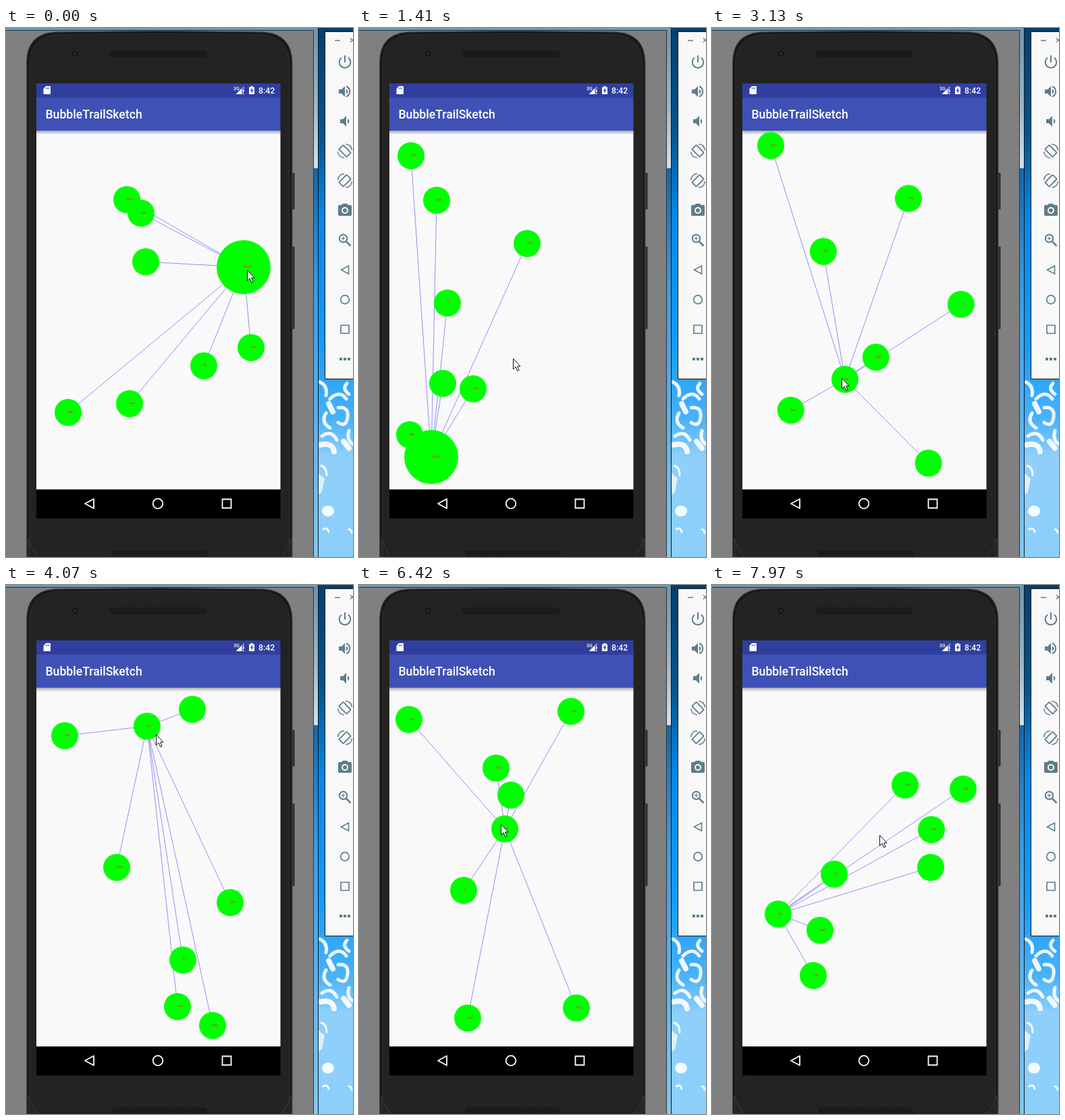
Recreate the animation shown at these times as an HTML page. Size 514 by 783 pixels, loop 8 s.

```html
<!DOCTYPE html>
<html lang="en">
<head>
<meta charset="utf-8">
<title>Node graph</title>
<style>
  html, body { margin: 0; width: 100%; height: 100%; overflow: hidden; background: #808080; }
  svg { display: block; width: 514px; height: 783px; }
  text { font-family: Roboto, "Open Sans", sans-serif; font-weight: 500; fill: #fff; }
  .icons { fill: none; stroke: #5f7d8b; stroke-width: 2; }
  .icons .solid { fill: #5f7d8b; stroke: none; }
  .nav { fill: none; stroke: #fff; stroke-width: 1.8; }
  .edge { stroke: #00f; stroke-opacity: .55; stroke-width: .8; }
  .node { fill: #0f0; }
  .label { font-size: 4.5px; font-weight: 400; fill: #ff2a00; }
</style>
</head>
<body>
<svg viewBox="0 0 514 783" xmlns="http://www.w3.org/2000/svg">
  <defs>
    <linearGradient id="sky" x2="0" y2="1">
      <stop offset="0" stop-color="#073f6c"/>
      <stop offset=".2" stop-color="#04558f"/>
      <stop offset=".36" stop-color="#0788e6"/>
      <stop offset=".6" stop-color="#179bf7"/>
      <stop offset=".74" stop-color="#4ab2fa"/>
      <stop offset=".81" stop-color="#8fd0fb"/>
      <stop offset="1" stop-color="#8ccffb"/>
    </linearGradient>
    <linearGradient id="glass" x2="0" y2="1">
      <stop offset="0" stop-color="#6f93ad"/>
      <stop offset=".15" stop-color="#9fb6c8"/>
      <stop offset=".264" stop-color="#d5e2ec"/>
      <stop offset=".266" stop-color="#1866a4"/>
      <stop offset=".5" stop-color="#3a9de6"/>
      <stop offset="1" stop-color="#86c6ee"/>
    </linearGradient>
    <linearGradient id="shade" x2="0" y2="1">
      <stop offset="0" stop-color="#000" stop-opacity=".32"/>
      <stop offset="1" stop-color="#000" stop-opacity="0"/>
    </linearGradient>
    <pattern id="mesh" width="4" height="4" patternUnits="userSpaceOnUse">
      <rect width="4" height="4" fill="#262626"/>
      <circle cx="1" cy="1" r="1" fill="#080808"/>
      <circle cx="3" cy="3" r="1" fill="#080808"/>
    </pattern>
  </defs>

  <!-- desktop -->
  <rect x="462" width="52" height="783" fill="url(#sky)"/>
  <g fill="none" stroke="#fff" stroke-linecap="round" stroke-width="5" opacity=".9">
    <path d="M465 524q12 6 9 20M480 549q14-14 24 0M505 526q-8 8 3 16M474 570q-8 14 6 22M492 562q16-2 14 14t-14 8M468 604q14-10 22 6M508 596q-4 14 6 20"/>
    <path d="M466 617q18-4 20 10M478 556l6 12M500 612l8 10" stroke-width="8"/>
    <path d="M467 648q8 2 8 14M470 742q6-4 8 4M508 742q3 0 4 5" stroke-width="3"/>
  </g>
  <ellipse cx="477" cy="715" rx="9" ry="8" fill="#fff" opacity=".9"/>
  <path d="M463 659l9 8-4 20-5 4z" fill="#fff" opacity=".7"/>

  <!-- window -->
  <rect width="462" height="783" fill="url(#glass)"/>
  <rect width="462" height="3" fill="#6d9ab5"/>
  <rect y="3" width="456" height="780" fill="#808080"/>
  <path d="M0 3.5H455.500V783" fill="none" stroke="#26343f"/>
  <path d="M462.500 0V783" stroke="#0a1620"/>

  <!-- phone -->
  <path d="M423 215h4v53h-4zM423 324h4v121h-4z" fill="#333" stroke="#1c1c1c" stroke-width=".8"/>
  <path d="M30.500 790V50Q31 9 72 6Q227 3 382 6Q423 9 424 50V790z" fill="#1a1a1a" stroke="#484848"/>
  <path d="M35 790V52Q36 14 74 10Q227 7 380 10Q418 14 419.500 52V790z" fill="#232323" stroke="#303030"/>
  <path d="M33 790V756q4 14 14 27M422 790V756q-4 14-14 27" fill="none" stroke="#3c3c3c"/>
  <circle cx="102" cy="38" r="4.500" fill="#171717"/>
  <circle cx="102" cy="38" r="1.800" fill="#303038"/>
  <rect x="153" y="33" width="145" height="10.500" rx="5" fill="url(#mesh)"/>
  <rect x="157" y="773" width="141" height="14" rx="5" fill="url(#mesh)"/>

  <!-- screen -->
  <rect x="45" y="152" width="361.500" height="531" fill="#f9f9f9"/>
  <rect x="45" y="152" width="361.500" height="6" fill="url(#shade)"/>
  <rect x="45" y="82" width="361.500" height="21" fill="#303f9f"/>
  <rect x="45" y="103" width="361.500" height="49" fill="#3f51b5"/>
  <rect x="45" y="683" width="361.500" height="43"/>
  <path d="M59 86h6q1 0 1 1v10q0 1-1 1h-8.500q-1 0-1-1V90z" fill="#fff"/>
  <path d="M59.500 88v2.500M61.500 88v2.500M63.500 88v2.500" stroke="#303f9f" stroke-width=".9"/>
  <text x="337" y="92" font-size="7">3G</text>
  <path d="M340.500 98L349 89.500V98z" fill="#fff"/>
  <path d="M349 98V89l4-3v4h-2v8z" fill="#8790c8"/>
  <path d="M351.800 91v4M351.800 96.500v1.500" stroke="#fff" stroke-width="1.500"/>
  <path d="M360 87.500h2.500V86h3v1.500h2.500V98h-8z" fill="#fff"/>
  <path d="M364.800 88.500l-3 4.500h1.700v3.500l3-4.500h-1.700z" fill="#303f9f"/>
  <text x="374" y="97" font-size="12.300">8:42</text>
  <text x="58.500" y="134" font-size="17.600">BubbleTrailSketch</text>
  <g class="nav">
    <path d="M117 704l13-7v14z" stroke-linejoin="round"/>
    <circle cx="225" cy="704" r="7.300"/>
    <path d="M320.500 697.500h13v13h-13z"/>
  </g>

  <!-- toolbar -->
  <path d="M472.500 5.500H520V519.500H472.500z" fill="#f8f8f8" stroke="#111"/>
  <g class="icons">
    <path d="M487 18.500h8M510 15l6 6M516 15l-6 6" stroke-width="1.300"/>
    <path d="M502 40.500v10.500M497 44a8.300 8.300 0 1 0 10 0"/>
    <path class="solid" d="M493 91h4l5-5v16l-5-5h-4zM504 90q5 4 0 8z"/>
    <path d="M504 86.500a8 8 0 0 1 0 15"/>
    <path class="solid" d="M495 135h4l5-5v16l-5-5h-4zM506 134q5 4 0 8z"/>
    <g id="turn" stroke-width="1.800">
      <rect x="497.500" y="174" width="9" height="16" rx="1" transform="rotate(-45 502 182)"/>
      <path d="M503 172q8 0 9.500 9M501 192q-8 0-9.500-9" stroke-width="1.500"/>
    </g>
    <use href="#turn" transform="matrix(-1 0 0 1 1004 44)"/>
    <path class="solid" d="M499 260h6l2 2h3q2 0 2 2v12q0 2-2 2h-16q-2 0-2-2v-12q0-2 2-2h3z"/>
    <circle cx="502" cy="270" r="4" fill="#5f7d8b" stroke="#f8f8f8"/>
    <circle cx="499.500" cy="311.500" r="5.700"/>
    <path d="M504 316l6.500 6.500" stroke-width="2.600"/>
    <path d="M496.500 311.500h6M499.500 308.500v6" stroke-width="1.200"/>
    <path d="M496.500 358l11-6v12z" stroke-width="1.600"/>
    <circle cx="502" cy="402" r="6.300" stroke-width="1.700"/>
    <path d="M496 440h12v12h-12z" stroke-width="1.700"/>
    <path class="solid" d="M494 488h4v4h-4zM500 488h4v4h-4zM506 488h4v4h-4z"/>
  </g>

  <g id="graph"></g>
  <path id="cursor" d="M.5 .5V16l3.600-3.400 2.600 6 2.400-1-2.600-5.800H11z" fill="#fff" stroke="#111"/>
</svg>
<script>
const LOOP = 8000;
const NAMES = ["ash", "oak", "elm", "fir", "yew", "bay", ""];

// Seven evenly spread children around a given centre
const spread = (cx, cy, left, top, w, h) => {
  const pts = [cx, cy];
  for (let i = 0; i < 7; i++) pts.push(left + w * (i * 0.618 % 1), top + h * i / 6);
  return pts;
};

// Each layout: centre first, then its children
const layouts = [
  [352,354, 179,254, 200,274, 363,473, 293,500, 183,556, 92,569, 207,346],
  [220,505, 383,228, 321,294, 114,476, 137,512, 109,538, 109,657, 342,488],
  [107,635, 77,189, 115,255, 249,319, 131,407, 169,534, 75,602, 124,526],
  spread(197, 520, 87, 174, 330, 470),
  [209,209, 87,223, 164,418, 332,470, 262,555, 254,624, 306,652, 276,184],
  [216,502, 195,234, 342,216, 207,308, 339,358, 325,399, 118,633, 285,562],
  [216,361, 74,199, 314,187, 203,271, 155,452, 161,641, 322,626, 225,311],
  spread(300, 330, 98, 185, 292, 390),
  [98,487, 286,296, 372,302, 325,362, 181,428, 160,511, 150,578, 324,418]
];
const switches = [0, 150, 1130, 2420, 3410, 4500, 5720, 6820, 7670];
const BIG = 3; // the first layouts show the large root

// Pointer moves: first step, last step, step count, destination
const moves = [
  [150, 860, 6, 227, 498],
  [1410, 2260, 7, 248, 330],
  [2420, 2420, 1, 247, 332],
  [2560, 3130, 5, 192, 518],
  [3410, 4070, 6, 222, 221],
  [4780, 5450, 6, 214, 513],
  [5720, 6110, 4, 210, 339],
  [6420, 6420, 1, 210, 354],
  [6820, 7390, 5, 304, 322],
  [7670, 7970, 3, 248, 370]
];

const graph = document.getElementById("graph");
const cursor = document.getElementById("cursor");

function add(parent, tag, attrs, text = "") {
  const el = document.createElementNS("http://www.w3.org/2000/svg", tag);
  for (const key in attrs) el.setAttribute(key, attrs[key]);
  el.textContent = text;
  return parent.appendChild(el);
}

function addNode(g, x, y, r, name) {
  add(g, "circle", { class: "node", cx: x, cy: y, r });
  add(g, "text", { class: "label", x, y: y + 1 }, name);
}

const groups = layouts.map((pts, n) => {
  const g = add(graph, "g", {});
  const [cx, cy] = pts;
  for (let i = 2; i < pts.length; i += 2)
    add(g, "line", { class: "edge", x1: cx, y1: cy, x2: pts[i], y2: pts[i + 1] });
  for (let i = 2; i < pts.length; i += 2)
    addNode(g, pts[i], pts[i + 1], 20, NAMES[i / 2 - 1]);
  addNode(g, cx, cy, n < BIG ? 40 : 20, n < BIG ? "forest" : "ivy");
  return g;
});

const ease = p => p * p * (3 - 2 * p);

function pointerAt(t) {
  let x = 357, y = 358;
  for (const [from, to, count, tx, ty] of moves) {
    if (t < from) break;
    const gap = (to - from) / Math.max(1, count - 1);
    const step = t >= to ? count : 1 + Math.floor((t - from) / gap);
    const p = ease(step / count);
    x += (tx - x) * p;
    y += (ty - y) * p;
  }
  return [Math.round(x), Math.round(y)];
}

function draw(t) {
  const current = switches.filter(s => s <= t).length - 1;
  groups.forEach((g, i) => g.setAttribute("display", i === current ? "inline" : "none"));
  cursor.setAttribute("transform", `translate(${pointerAt(t)})`);
}

const start = performance.now();
function tick() {
  draw((performance.now() - start) % LOOP);
  requestAnimationFrame(tick);
}
tick();
</script>
</body>
</html>
```
